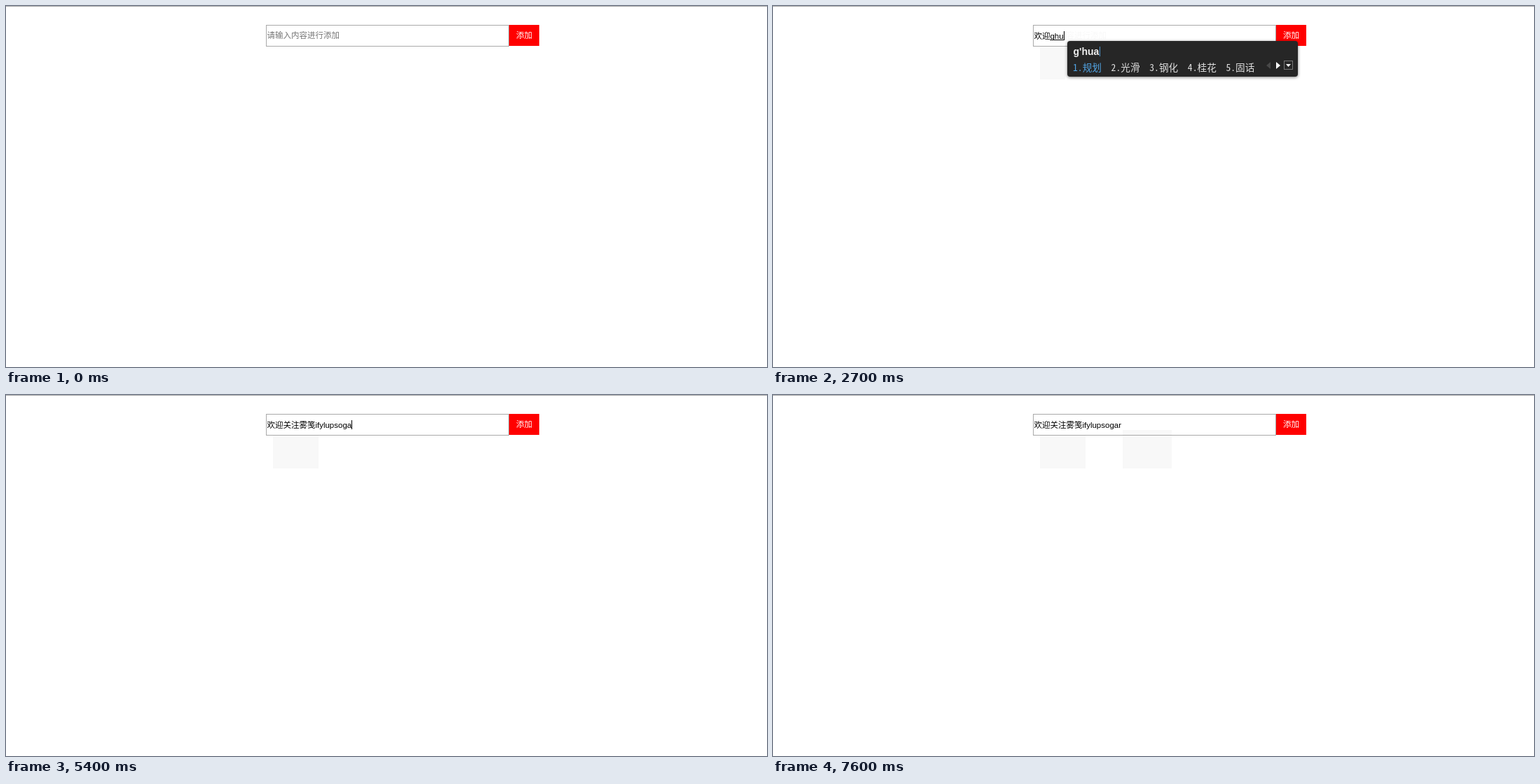
Write an HTML page with a canvas that moves like this. It is 1086 by 516 pixels and loops after 8000 ms.

```html
<!DOCTYPE html>
<html lang="zh-CN">
<head>
<meta charset="utf-8">
<style>
html, body { margin: 0; width: 100%; height: 100%; overflow: hidden; background: #fff; }
canvas { display: block; }
</style>
</head>
<body>
<canvas id="stage" width="1086" height="516"></canvas>
<script>
const ctx = document.getElementById('stage').getContext('2d');
const LOOP = 8000, TEXT_X = 372.4, CELL = 13.65;
const CJK = '"Noto Sans CJK SC", "Noto Sans CJK", sans-serif';
const BODY = '11.5px "Liberation Sans", ' + CJK;
const TITLE = 'bold 14px "Liberation Sans", sans-serif';
const LIST = '300 13.6px "Noto Sans Mono CJK SC", ' + CJK;

const hello = '欢迎', follow = hello + '关注', brand = follow + '雾笺';
const account = 'ifylupsogar', full = brand + account;

// time, committed text, composed letters, popup title, candidates
const steps = [
  [0, '', ''],
  [1700, '', 'h'],
  [1800, '', 'hua', 'hu', '护 胡 湖 互 虎'],
  [1900, '', 'huan', 'hua', '话 花花 画画 花好月圆 华'],
  [2100, '', 'huany', 'huan', '换 还 欢乐 环境 幻灯片'],
  [2200, '', 'huanyi', "huan'y", '欢迎 还有 欢颜 换药 幻影'],
  [2300, '', 'huanyi', "huan'yi", '欢迎 换衣 还以 欢意 环翼'],
  [2500, hello, ''],
  [2600, hello, 'g', 'g', '个 给 过 刚 更'],
  [2700, hello, 'ghu', "g'hua", '规划 光滑 钢化 桂花 固话'],
  [2800, hello, 'ghua', "g'huan", '更换 归还 光环 够换 刚换'],
  [2900, hello, 'ghuan', "g'huan", '更换 归还 光环 够换 刚换'],
  [3000, hello, 'ghuanz', "g'huan'z", '关注 更换中 光环在 归还 更换'],
  [3100, hello, 'ghuanzh', "g'huan'zh", '关注 更换中 光环中 归还 更换'],
  [3300, follow, ''],
  [3400, follow, 'w', 'w', '我 问 为 (๑ŐДŐ)b 往'],
  [3500, follow, 'wu', 'wu', '无 五 物 务 屋'],
  [3700, follow, 'wuji', "wu'ji", '无机 五级 物极 武技 无极'],
  [3800, follow, 'wujian', "wu'jian", '雾笺 无间 物件 无剑可用 五件'],
  [4000, brand, ''],
  ...[4200, 4300, 4500, 4600, 4800, 5000, 5100, 5300, 5400, 5600].map(
    (t, i) => [t, brand + account.slice(0, i < 4 ? i + 1 : i + 2), '']),
  [6000, full, 'go', 'go', '够 狗 购 沟 构'],
  [6100, full, 'gon', 'gon', '共 工 公 供 个哦你'],
  [6200, full, 'gong', 'gong', '共 工 公 供 个哦你公'],
  [6300, full, 'gongz', "gong'z", '工作 公众 工资 公正 共振'],
  [6400, full, 'gongzh', "gong'zh", '公众 公正 工长 公章 共振'],
  [6500, full, 'gongzho', "gong'zho", '公众 工种 公州 公中 共轴'],
  [6600, full, 'gongzhong', "gong'zhong", '公众 工种 公中 共众 宫中'],
  [6700, full, 'gongzhongh', "gong'zhong'h", '公众号 公众 公 工种 公众会'],
  [6800, full, 'gongzhongha', "gong'zhong'ha", '公众号 公众 公 工种 公众哈'],
  [6900, full, 'gongzhonghao', "gong'zhong'hao", '公众号 公众 公 工种 宫中好'],
  [7100, full, '']
];

function rect(color, x, y, w, h) {
  ctx.fillStyle = color;
  ctx.fillRect(x, y, w, h);
}

function text(str, x, y, font, color) {
  ctx.font = font;
  ctx.fillStyle = color;
  ctx.fillText(str, x, y);
}

function widthOf(str, font) {
  ctx.font = font;
  return ctx.measureText(str).width;
}

function triangle(color, ...points) {
  ctx.fillStyle = color;
  ctx.beginPath();
  for (let i = 0; i < 6; i += 2) ctx.lineTo(points[i], points[i + 1]);
  ctx.fill();
}

const popupLeft = ([, done, , title]) =>
  Math.round(TEXT_X + widthOf(done + title.replace(/'/g, ''), BODY) - 1);

const cellWidth = ch => ch === 'Д' || ch > '\u2e80' ? CELL : CELL / 2;

function popup(step) {
  const [, , , title, list] = step, x = popupLeft(step);
  const items = list.split(' ').map((s, i) => `${i + 1}.${s}`);
  const listWidth = items.reduce((w, s) => w + [...s].reduce((a, c) => a + cellWidth(c), 0), 0)
    + CELL * (items.length - 1);
  const right = Math.round(x + 70 + listWidth);

  ctx.save();
  ctx.shadowColor = 'rgba(0,0,0,.5)';
  ctx.shadowBlur = 4;
  ctx.shadowOffsetY = 1;
  ctx.fillStyle = '#262626';
  ctx.beginPath();
  ctx.roundRect(x, 50, right - x, 51, 4);
  ctx.fill();
  ctx.restore();

  text(title, x + 8.5, 70, TITLE, '#eee');
  rect('#4a90c8', Math.round(x + 9 + widthOf(title, TITLE)), 58, 1, 14);

  let cx = x + 8;
  ctx.textAlign = 'center';
  items.forEach((item, i) => {
    for (const ch of item) {
      const w = cellWidth(ch);
      text(ch, cx + w / 2, 93, LIST, i ? '#e0e0e0' : '#52a5e5');
      cx += w;
    }
    cx += CELL;
  });
  ctx.textAlign = 'left';

  triangle('#484848', right - 39, 80, right - 39, 90, right - 45, 85);
  triangle('#fff', right - 31, 80, right - 31, 90, right - 25, 85);
  ctx.strokeStyle = '#777';
  ctx.strokeRect(right - 19.5, 78.5, 12, 12);
  triangle('#fff', right - 17, 83, right - 10, 83, right - 13.5, 87);
}

function draw(t) {
  const past = steps.filter(s => s[0] <= t), step = past[past.length - 1];
  const [, done, typed, title] = step;
  // how far right the popup has travelled so far
  const reach = Math.max(381, ...past.filter(s => s[3]).map(s => popupLeft(s) - 3));

  rect('#fff', 0, 0, 1086, 516);
  rect('#a9a9a9', 0, 0, 1086, 1);

  const empty = !done && !typed;
  text('请输入内容进行添加', TEXT_X, 46.4, BODY, empty ? '#757575' : '#f8f8f8');
  if (!empty) rect('#fff', 372, 28, reach - 369, 29);

  // faint trails left below the field
  rect('#f8f8f8', 381, 58, Math.min(reach, 446) - 381, 47);
  if (reach > 499) rect('#f8f8f8', 499, 50, Math.min(reach, 569) - 499, 55);

  ctx.lineWidth = 1;
  ctx.strokeStyle = '#a9a9a9';
  ctx.strokeRect(371.5, 27.5, 346, 30);
  rect('#f00', 718, 27, 43, 30);
  text('添加', 728, 46.4, BODY, '#fff');

  text(done + typed, TEXT_X, 47.2, BODY, '#000');
  const start = TEXT_X + widthOf(done, BODY);
  const end = TEXT_X + widthOf(done + typed, BODY);
  if (typed) rect('#000', Math.round(start), 48, Math.round(end) - Math.round(start), 1);
  if ((t >= 600 && t < 1100) || (t >= 1600 && t < 7600))
    rect('#000', Math.floor(end + 0.6), 36, 1, 13);

  if (title) popup(step);
}

function frame() {
  draw(performance.now() % LOOP);
  requestAnimationFrame(frame);
}
frame();
</script>
</body>
</html>
```
